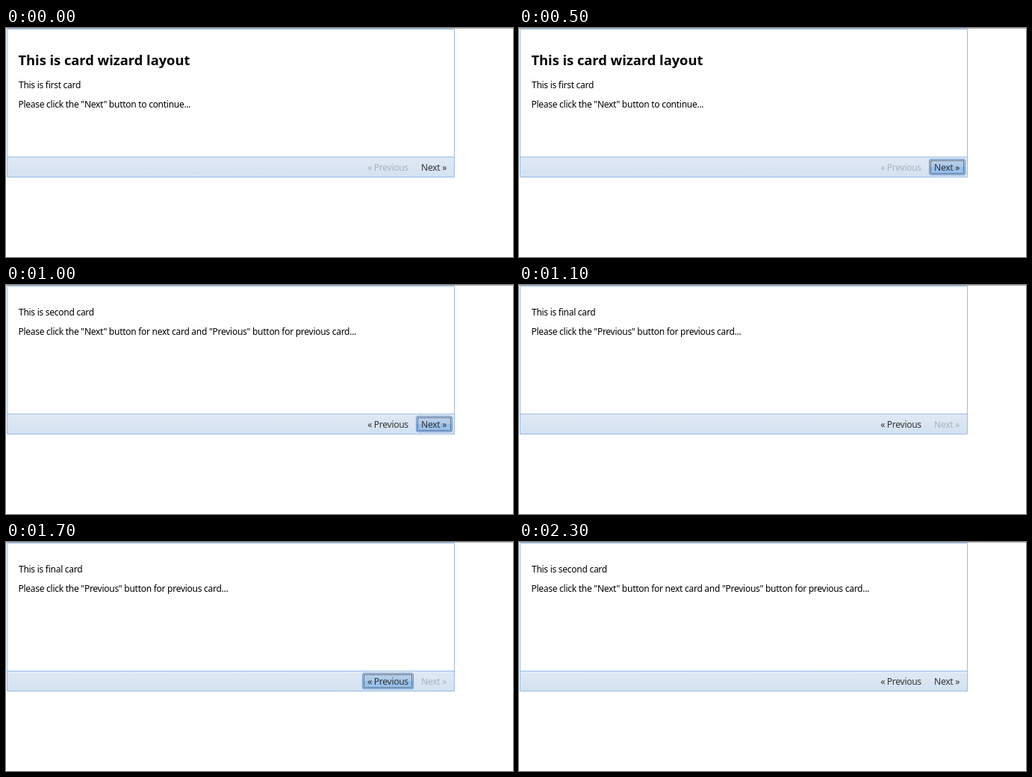
Animation, 679 px wide and 308 px high, one loop 2400 ms. Source, as an HTML page:

```html
<!DOCTYPE html>
<html lang="en">
<head>
<meta charset="utf-8">
<title>Card wizard layout</title>
<style>
  html, body { margin: 0; width: 100%; height: 100%; overflow: hidden; background: #fff; }
  svg { display: block; width: 679px; height: 308px; }
  text { font: 12px "Noto Sans", "Open Sans", sans-serif; letter-spacing: -.27px; fill: #000; }
  .title { font-size: 18.3px; font-weight: bold; letter-spacing: 0; }
  .label { fill: #333; text-anchor: middle; }
  .edge { fill: none; stroke: #99bce8; }
  .hover { fill: url(#over); stroke: #81a4d0; }
  .pressed { fill: url(#down); stroke: #6d93c4; }
  .focus { fill: none; stroke: #222; stroke-dasharray: 1 1; stroke-dashoffset: 1.5; }

  /* Every part switches hard; one loop is 2400 ms. */
  .card, .hover, .pressed, .focus, .label { animation: 2400ms step-end infinite; }
  .first { animation-name: first; }
  .second { animation-name: second; }
  .final { animation-name: final; }
  .next .hover { animation-name: next-hover; }
  .next .pressed { animation-name: next-pressed; }
  .next .focus { animation-name: next-focus; }
  .next .label { animation-name: next-label; }
  .previous .hover { animation-name: previous-hover; }
  .previous .pressed { animation-name: previous-pressed; }
  .previous .focus { animation-name: previous-focus; }
  .previous .label { animation-name: previous-label; }

  @keyframes first { 0% { opacity: 1 } 25%, 100% { opacity: 0 } }
  @keyframes second { 0%, 45.833% { opacity: 0 } 25%, 75%, 100% { opacity: 1 } }
  @keyframes final { 0%, 75%, 100% { opacity: 0 } 45.833% { opacity: 1 } }

  @keyframes next-hover { 0%, 45.833%, 100% { opacity: 0 } 16.666% { opacity: 1 } }
  @keyframes next-pressed { 0%, 25%, 45.833%, 100% { opacity: 0 } 20.833%, 41.666% { opacity: 1 } }
  @keyframes next-focus { 0%, 45.833%, 100% { opacity: 0 } 20.833% { opacity: 1 } }
  @keyframes next-label { 0%, 75%, 100% { opacity: 1 } 45.833% { opacity: .28 } }

  @keyframes previous-hover { 0%, 79.166%, 100% { opacity: 0 } 58.333% { opacity: 1 } }
  @keyframes previous-pressed { 0%, 75%, 100% { opacity: 0 } 70.833% { opacity: 1 } }
  @keyframes previous-focus { 0%, 95.833%, 100% { opacity: 0 } 58.333% { opacity: 1 } }
  @keyframes previous-label { 0% { opacity: .28 } 25%, 100% { opacity: 1 } }
</style>
</head>
<body>
<svg viewBox="0 0 679 308">
  <defs>
    <linearGradient id="bar" x2="0" y2="1">
      <stop stop-color="#dfe9f4"/><stop offset="1" stop-color="#d3e1f1"/>
    </linearGradient>
    <linearGradient id="over" x2="0" y2="1">
      <stop stop-color="#dbeeff"/><stop offset=".48" stop-color="#d0e7ff"/>
      <stop offset=".52" stop-color="#bbd2f0"/><stop offset="1" stop-color="#bed6f5"/>
    </linearGradient>
    <linearGradient id="down" x2="0" y2="1">
      <stop stop-color="#bccfe5"/><stop offset=".48" stop-color="#abc9ea"/>
      <stop offset=".52" stop-color="#94bdea"/><stop offset="1" stop-color="#9cc5f0"/>
    </linearGradient>
  </defs>

  <rect width="679" height="1" fill="#b0b0b0"/>
  <rect x="2" y="174" width="598" height="26" fill="url(#bar)"/>
  <path class="edge" d="M1.5 1.5h599v199h-599zM2 173.5h598"/>

  <g class="card first">
    <text class="title" x="16.5" y="50">This is card wizard layout</text>
    <text x="17" y="81">This is first card</text>
    <text x="16.5" y="107">Please click the "Next" button to continue...</text>
  </g>
  <g class="card second">
    <text x="17" y="41">This is second card</text>
    <text x="16.5" y="67">Please click the "Next" button for next card and "Previous" button for previous card...</text>
  </g>
  <g class="card final">
    <text x="17" y="41">This is final card</text>
    <text x="16.5" y="67">Please click the "Previous" button for previous card...</text>
  </g>

  <g class="previous">
    <rect class="hover" x="477.5" y="176.5" width="68" height="21" rx="2.5"/>
    <rect class="pressed" x="477.5" y="176.5" width="68" height="21" rx="2.5"/>
    <rect class="focus" x="479.5" y="178.5" width="64" height="17"/>
    <text class="label" x="511.5" y="192">« Previous</text>
  </g>
  <g class="next">
    <rect class="hover" x="549.5" y="176.5" width="48" height="21" rx="2.5"/>
    <rect class="pressed" x="549.5" y="176.5" width="48" height="21" rx="2.5"/>
    <rect class="focus" x="551.5" y="178.5" width="44" height="17"/>
    <text class="label" x="573" y="192">Next »</text>
  </g>
</svg>
</body>
</html>
```
